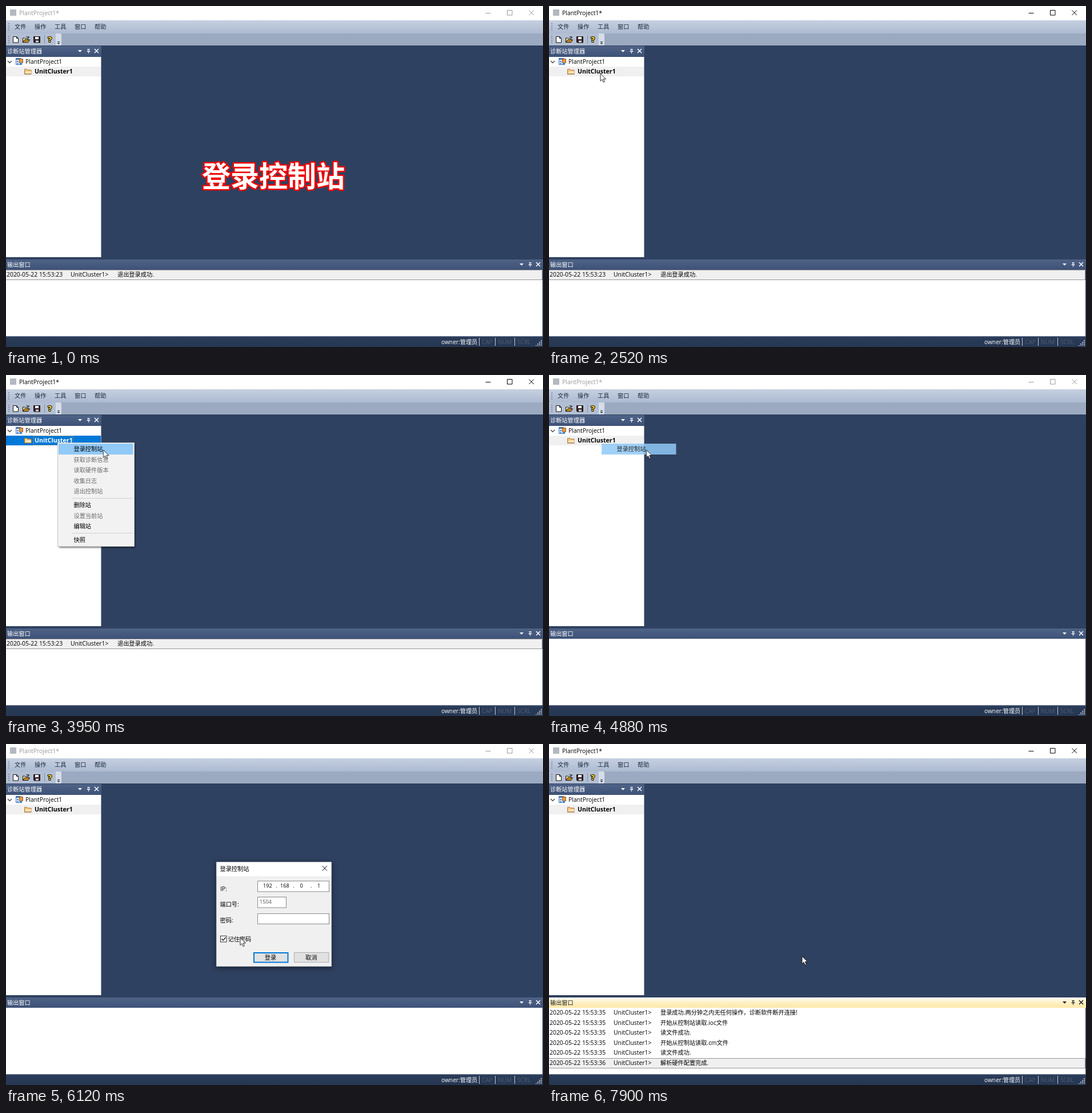
An HTML page that plays this animation: 940x596 px, repeating every 7990 ms.

```html
<!DOCTYPE html>
<html lang="zh-CN">
<head>
<meta charset="utf-8">
<title>登录控制站</title>
<style>
html, body { margin: 0; width: 100%; height: 100%; overflow: hidden; background: #2f4160; }
svg { display: block; width: 940px; height: 596px; }
text { font: 10.2px "Open Sans", "Noto Sans CJK SC", "Noto Sans CJK", sans-serif; fill: currentColor; white-space: pre; }
.latin { font-size: 10.4px; }
.bold { font-size: 10.6px; font-weight: 700; }
.num { font-size: 9.2px; }
.mid { text-anchor: middle; }
.off { color: #6d6d6d; }
.line { fill: none; stroke: currentColor; }
.field { fill: #fff; stroke: #8a8a8a; }
#caption { font-size: 50px; font-weight: 700; fill: #fff; stroke: #f00a0a; stroke-width: 5px; stroke-linejoin: round; paint-order: stroke; }
#dialog { transform-origin: 469px 297.5px; }
#frame { filter: drop-shadow(0 2px 5px rgba(0, 0, 0, .55)); }
#shade { filter: blur(1.5px); }
</style>
</head>
<body>
<svg viewBox="0 0 940 596">
  <defs>
    <linearGradient id="menuFill" x2="0" y2="1"><stop stop-color="#c6d0e1"/><stop offset="1" stop-color="#adbad0"/></linearGradient>
    <linearGradient id="headFill" x2="0" y2="1"><stop stop-color="#4f6387"/><stop offset="1" stop-color="#3d5277"/></linearGradient>
    <linearGradient id="creamFill" x2="0" y2="1"><stop stop-color="#fffcf4"/><stop offset=".5" stop-color="#fff0c4"/><stop offset="1" stop-color="#ffe8a6"/></linearGradient>
    <linearGradient id="statusFill" x2="0" y2="1"><stop stop-color="#2f4160"/><stop offset=".25" stop-color="#293a57"/><stop offset="1" stop-color="#263753"/></linearGradient>
    <g id="paneIcons">
      <path d="M0 0h7l-3.500 3.800z" fill="currentColor"/>
      <path class="line" d="M16.500-1.500h4M17.500-1.500v4M19.700-1.500v4M15.500 2.500h6M18.500 2.500v3.500"/>
      <path class="line" stroke-width="1.500" d="M29-2l7 7M36-2l-7 7"/>
    </g>
    <path id="grip" d="M5 0v13" stroke="#5f6f8b" stroke-width="1.500" stroke-dasharray="1.500 2.200"/>
  </defs>

  <rect width="940" height="596" fill="#2f4160"/>

  <!-- title bar -->
  <rect width="940" height="25" fill="#fff"/>
  <rect x="7" y="6" width="11" height="11" fill="#b4b8bf"/>
  <g id="title">
    <text class="latin" x="23" y="16">PlantProject1*</text>
    <path class="line" d="M839.500 12.500h9M877.500 7.500h8.500v8.500h-8.500zM915.500 7.500l8.500 8.500M924 7.500l-8.500 8.500"/>
  </g>

  <!-- menu and toolbar -->
  <rect y="25" width="940" height="23" fill="url(#menuFill)"/>
  <rect y="48" width="940" height="21" fill="#9caac1"/>
  <rect y="48" width="90" height="21" fill="#b3bfd3"/>
  <path d="M87 48h8q2 0 2 2v17q0 2-2 2h-8z" fill="#d6dde8"/>
  <use href="#grip" y="30"/>
  <use href="#grip" y="52"/>
  <g color="#1b293e">
    <text x="15" y="40">文件</text><text x="50" y="40">操作</text><text x="85" y="40">工具</text>
    <text x="120" y="40">窗口</text><text x="155" y="40">帮助</text>
  </g>
  <path d="M12.500 53.500h6l3 3v7.500h-9zM18.500 53.500v3h3" fill="#fff" stroke="#111"/>
  <path d="M29.500 63.500v-7.500h3l1 1h5v2" fill="#ffe9a0" stroke="#111"/>
  <path d="M29.500 63.500l3-4.500h9l-3 4.500z" fill="#c98d28" stroke="#111"/>
  <path d="M35.500 54q2.500-2 4 1M40 53v2.500h-2.500" fill="none" stroke="#111"/>
  <path d="M48.500 53.500h11v10.500h-10l-1-1z" fill="#35212a" stroke="#111"/>
  <path d="M51 54h6v4h-6z" fill="#fff"/><path d="M52 60.500h5v3h-5z" fill="#d5d5d5"/>
  <path d="M67.500 51v15" stroke="#8592aa"/>
  <text x="73.500" y="63" style="font-size:13px;font-weight:800;fill:#ffd51e;stroke:#111;stroke-width:2px;paint-order:stroke">?</text>
  <path d="M90 62.500h4" stroke="#1b293e"/><path d="M89.500 64.500h5l-2.500 2.500z" fill="#1b293e"/>

  <!-- station pane -->
  <rect y="70" width="167" height="19" fill="url(#headFill)"/>
  <g color="#fff"><text x="2" y="83">诊断站管理器</text><use href="#paneIcons" x="126" y="77"/></g>
  <rect y="89" width="166.500" height="350" fill="#fff"/>
  <path class="line" d="M3 96l3.500 3.500L10 96" stroke-width="1.200" color="#333"/>
  <path d="M17.500 91.500h8v11h-8z" fill="#e8f0fb" stroke="#3f74b5"/>
  <path d="M17 91h9v3h-9z" fill="#3f74b5"/>
  <path d="M23.500 92.500h6v7h-6z" fill="#e9963c" stroke="#9a5a24"/>
  <path d="M19 96h3v2h-3zM19 99.500h3v2h-3z" fill="#4b86cb"/>
  <path d="M24 99h4v4h-4z" fill="#4b86cb"/>
  <text class="latin" x="34" y="101">PlantProject1</text>
  <rect y="106" width="166" height="17" fill="#f0f0f0"/>
  <text class="bold" x="50" y="118">UnitCluster1</text>
  <g id="chosen">
    <rect y="106" width="166" height="17" fill="#0078d7"/>
    <rect x="48.500" y="106.500" width="69" height="16" fill="none" stroke="#dfa067" stroke-dasharray="1 1"/>
    <text class="bold" x="50" y="118" color="#fff">UnitCluster1</text>
  </g>
  <path d="M32.500 118.500v-8h4l1.500 1.500h6v6.500z" fill="#f2c57c" stroke="#b07a3c"/>
  <path d="M33 118.500l2-4.500h9v4.500z" fill="#fbe3b4"/>
  <path d="M32 119h12.500" stroke="#8d5a28"/>

  <!-- output pane -->
  <rect y="443" width="940" height="18" fill="url(#headFill)"/>
  <rect id="cream" y="443" width="940" height="18" fill="url(#creamFill)"/>
  <g id="outHead"><text x="2" y="456">输出窗口</text><use href="#paneIcons" x="899" y="450"/></g>
  <rect y="461" width="939" height="116.500" fill="#fff"/>
  <g id="mark">
    <rect y="461.500" width="939" height="17" fill="#f0f0f0"/>
    <path d="M0 461.500h938.500v17H0" fill="none" stroke="#333" stroke-dasharray="1 1"/>
  </g>
  <g id="log"></g>

  <!-- status bar -->
  <rect y="577.500" width="940" height="18.500" fill="url(#statusFill)"/>
  <text x="762" y="591" color="#fff">owner:管理员</text>
  <path d="M828.500 580v14M856.500 580v14M890.500 580v14" stroke="#c3cad6"/>
  <g color="#505c70" class="latin"><text x="833" y="591">CAP</text><text x="861" y="591">NUM</text><text x="895" y="591">SCRL</text></g>
  <path d="M937 584v10M934 587v7M931 590v4M928 593v1" stroke="#d3d8e1" stroke-width="1.800" stroke-dasharray="1.700 1.300"/>

  <text id="caption" x="343" y="315.500">登录控制站</text>

  <!-- login dialog -->
  <g id="dialog">
    <rect id="frame" x="368" y="206" width="202" height="183" fill="#f0f0f0"/>
    <rect x="368" y="206" width="202" height="25" fill="#fff"/>
    <rect x="368" y="206" width="202" height="183" fill="none" stroke="#59647a" stroke-width=".6"/>
    <text x="374.500" y="221.500">登录控制站</text>
    <path id="cross" class="line" d="M553.500 213l8.500 8.500M562 213l-8.500 8.500"/>
    <text x="375" y="257">IP:</text><text x="374.500" y="284">端口号:</text><text x="374.500" y="311.500">密码:</text>
    <rect class="field" x="440.500" y="239.500" width="125" height="18.500"/>
    <rect class="field" x="440.500" y="267.500" width="50" height="18.500"/>
    <rect class="field" x="440.500" y="296.500" width="125" height="18"/>
    <g id="ip"></g>
    <text class="num" x="444" y="279" color="#555">1504</text>
    <rect x="375.500" y="335.500" width="10.500" height="10.500" fill="#fff" stroke="#333"/>
    <path class="line" d="M377.500 340.500l2.500 2.700 4.500-5.200" stroke-width="1.200"/>
    <text x="388.500" y="345">记住密码</text>
    <rect id="login" x="434" y="365" width="59.500" height="16.500" stroke-width="2"/>
    <rect x="504.500" y="364.500" width="60.500" height="17" fill="#e1e1e1" stroke="#adadad"/>
    <text class="mid" x="463" y="377">登录</text><text class="mid" x="534.500" y="377">取消</text>
  </g>

  <!-- context menu -->
  <g id="menu">
    <rect id="shade" x="93" y="122" width="133" height="180" fill="#000" opacity=".5"/>
    <rect x="90.500" y="118.500" width="134" height="181" fill="#f2f2f2" stroke="#c6c6c6"/>
    <path d="M115 215.500h107.500M115 276.500h107.500" stroke="#d0d0d0"/>
    <g id="items"></g>
  </g>
  <g id="pick">
    <rect x="92" y="120" width="130.500" height="19" fill="#91c9f7"/>
    <text x="118.500" y="133">登录控制站</text>
  </g>

  <path id="cursor" d="M0 0V13.200L3 10.400 5.200 15.200 7.400 14.200 5.200 9.600H9.400Z" fill="#fff" stroke="#111" stroke-width=".9"/>
</svg>
<script>
const LOOP = 7990;
const $ = id => document.getElementById(id);

function label(parent, x, y, str, cls = '') {
  const el = document.createElementNS('http://www.w3.org/2000/svg', 'text');
  el.setAttribute('x', x);
  el.setAttribute('y', y);
  el.setAttribute('class', cls);
  el.textContent = str;
  parent.append(el);
}

// Holds each value until the next listed time (ms).
function track(el, prop, steps) {
  const frames = steps.map(([ms, v]) => ({ offset: ms / LOOP, [prop]: v, easing: 'step-end' }));
  frames.push({ offset: 1, [prop]: steps[steps.length - 1][1] });
  el.animate(frames, { duration: LOOP, iterations: Infinity });
}
const fade = (el, ...steps) => track(el, 'opacity', steps);

// Context menu entries: text, centre line, disabled
[['登录控制站', 129], ['获取诊断信息', 147.5, 1], ['读取硬件版本', 166, 1], ['收集日志', 184.5, 1],
 ['退出控制站', 203, 1], ['删除站', 227], ['设置当前站', 245.5, 1], ['编辑站', 264], ['快照', 288]]
  .forEach(([s, y, off]) => label($('items'), 118.5, y + 4, s, off ? 'off' : ''));

[['192', 450], ['.', 472.5], ['168', 480], ['.', 502.5], ['0', 514.5], ['.', 533], ['1', 545]]
  .forEach(([s, x]) => label($('ip'), x, 251, s, 'num'));

// Output lines: row, second, message, shown from, shown until
const ROW = 17.6;
function logLine(row, sec, msg, from, to) {
  const g = document.createElementNS('http://www.w3.org/2000/svg', 'g');
  const y = 473 + row * ROW;
  $('log').append(g);
  label(g, 1, y, '2020-05-22 15:53:' + sec, 'latin');
  label(g, 113, y, 'UnitCluster1>', 'latin');
  label(g, 195, y, msg);
  fade(g, ...(from ? [[0, 0], [from, 1]] : [[0, 1], [to, 0]]));
}
const added = [6810, 6890, 6970, 7050, 7130, 7350];
logLine(0, 23, '退出登录成功.', 0, 4880);
['登录成功.两分钟之内无任何操作，诊断软件断开连接!', '开始从控制站读取.ioc文件', '读文件成功.',
 '开始从控制站读取.cm文件', '读文件成功.', '解析硬件配置完成.']
  .forEach((msg, i) => logLine(i, i < 5 ? 35 : 36, msg, added[i]));
fade($('mark'), [0, 1], [4880, 0], [6810, 1]);
track($('mark'), 'transform', [[0, 'translateY(0px)'],
  ...added.map((ms, i) => [ms, `translateY(${Math.round(i * ROW)}px)`])]);

// Window states
track($('title'), 'color', [[0, '#999'], [2520, '#000'], [4880, '#999'], [6810, '#000']]);
track($('outHead'), 'color', [[0, '#fff'], [6810, '#1b1b1b']]);
fade($('cream'), [0, 0], [6810, 1]);
fade($('caption'), [0, 1], [500, 0]);
fade($('chosen'), [0, 0], [2690, 1], [4880, 0]);
fade($('menu'), [0, 0], [2690, .5], [2760, .85], [2840, 1], [4880, 0]);
fade($('pick'), [0, 0], [3380, 1], [4880, .85], [4960, .55], [5050, .3], [5120, .12], [5190, 0]);

// Dialog
fade($('dialog'), [0, 0], [4960, .3], [5050, .66], [5120, .9], [5190, 1],
  [6810, .93], [6890, .75], [6970, .42], [7050, .14], [7130, 0]);
track($('dialog'), 'transform', [[0, 'scale(.97)'], [5050, 'scale(.986)'], [5120, 'scale(.995)'],
  [5190, 'scale(1)'], [6810, 'scale(.997)'], [6890, 'scale(.991)'], [6970, 'scale(.975)'], [7050, 'scale(.96)']]);
fade($('cross'), [0, 1], [6810, 0]);
track($('login'), 'fill', [[0, '#e1e1e1'], [6360, '#e5f1fb'], [6670, '#cce4f7'], [6810, '#e5f1fb']]);
track($('login'), 'stroke', [[0, '#0078d7'], [6670, '#005499'], [6810, '#0078d7']]);

// Pointer: sampled moves from the last position
const path = [[0, 638, 237]];
function move(t0, t1, n, x, y, ease) {
  const [, x0, y0] = path[path.length - 1];
  for (let i = 0; i < n; i++) {
    const ms = Math.floor((t0 + (t1 - t0) * i / Math.max(1, n - 1)) / 10) * 10;
    const u = ease((i + 1) / n);
    path.push([ms, x0 + (x - x0) * u, y0 + (y - y0) * u]);
  }
}
const smooth = u => u * u * (3 - 2 * u);
const easeOut = u => u * (2 - u);
move(1270, 1990, 10, 101.5, 108.5, smooth);
move(2140, 2290, 3, 90, 118, easeOut);
move(3380, 3780, 6, 170.5, 131, smooth);
move(5730, 6440, 10, 455.5, 378, easeOut);
move(7900, 7900, 1, 443, 371, easeOut);
track($('cursor'), 'transform', path.map(([ms, x, y]) => [ms, `translate(${x.toFixed(1)}px, ${y.toFixed(1)}px)`]));
fade($('cursor'), [0, 0], [500, 1]);
</script>
</body>
</html>
```
